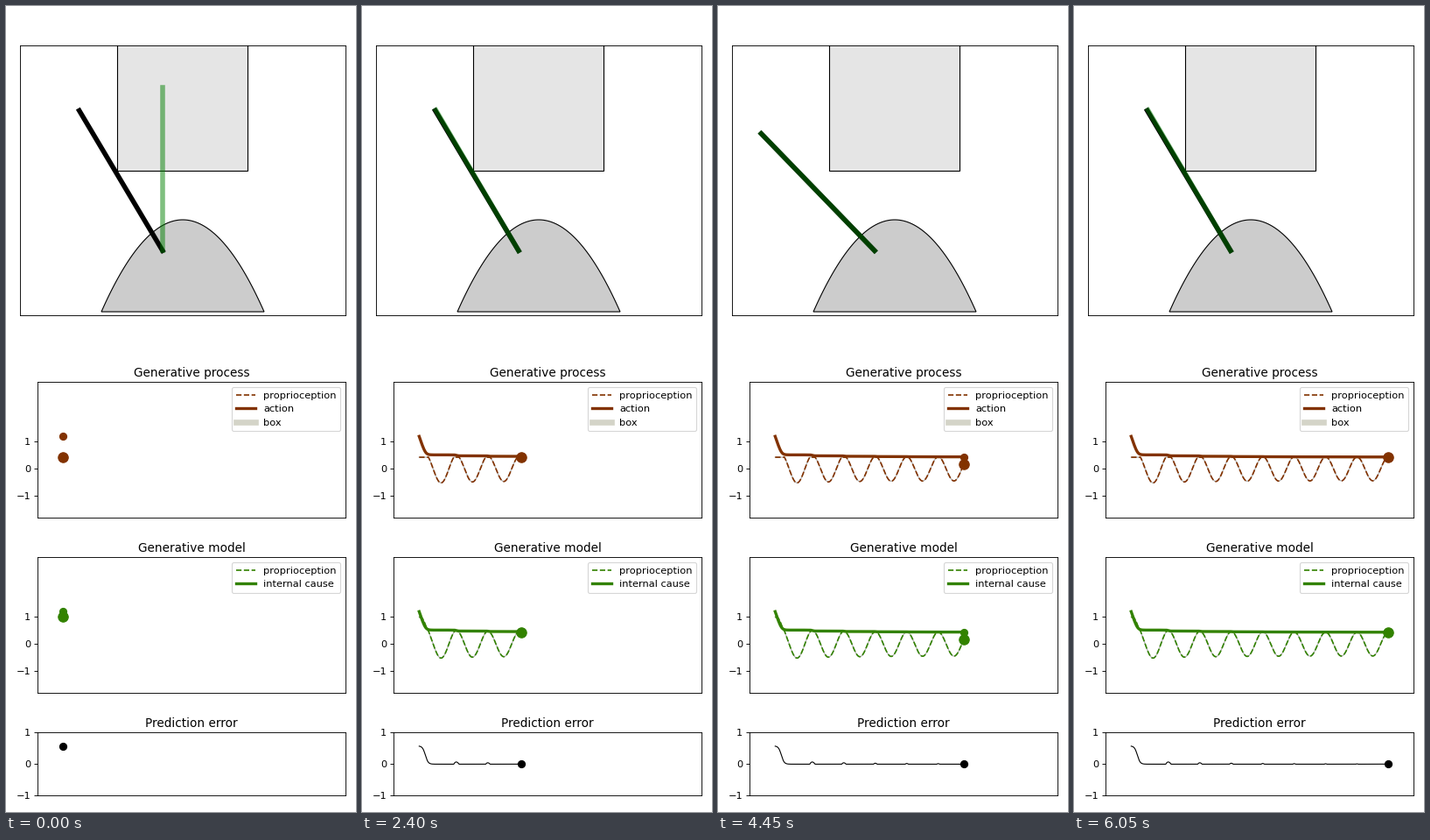
Write a matplotlib script that moves like this. It is 400 by 920 pixels and loops after 6.1 s.

```python
import numpy as np
import matplotlib.pyplot as plt
from matplotlib.animation import FuncAnimation
from matplotlib.patches import Polygon, Rectangle

W, H, DPI = 400, 920, 80
FRAMES, SUB = 122, 10
LIMIT = 0.43                 # angle at which the whisker meets the box
PERIOD, PEAK = 14.8, 2.9     # oscillation, in frames
BROWN, GREEN = "#823200", "#328200"
PIVOT, LENGTH = (178.9, 279.2), 186

plt.rcParams["font.size"] = 10.2


def simulate():
    """Amplitude, felt angle and predicted angle over time."""
    t = np.arange((FRAMES - 1) * SUB + 1) / SUB
    start = 1 / (1 + np.exp(1.5 * (t - 2.9)))
    start *= (1 - LIMIT) / start[0]
    wave = np.cos(2 * np.pi * (t - PEAK) / PERIOD)
    amp, felt, error = np.zeros((3, t.size))
    a = 1.2
    for i, s in enumerate(t):
        amp[i] = a
        if s < PEAK:
            felt[i], error[i] = LIMIT, start[i]
        else:
            swing = a * wave[i]
            felt[i] = min(swing, LIMIT)
            error[i] = start[i] if s < 8 else max(swing - LIMIT, 0)
        a -= (0.4 if s < 8 else 0.3) * error[i] / SUB
    return t, amp, felt, felt + error, error


t, amp, felt, guess, error = simulate()

fig = plt.figure(figsize=(W / DPI, H / DPI), dpi=DPI, facecolor="white")


def panel(left, top, right, bottom, **kw):
    box = [left / W, 1 - bottom / H, (right - left) / W, (bottom - top) / H]
    return fig.add_axes(box, **kw)


def chart(top, bottom, title, ylim):
    ax = panel(36, top, 388, bottom)
    span = FRAMES - 1
    ax.set(xlim=(-0.1 * span, 1.1 * span), ylim=ylim,
           xticks=[], yticks=[-1, 0, 1])
    ax.set_title(title)
    return ax


traces, dots = [], []


def trace(ax, data, **kw):
    line, = ax.plot([], [], **kw)
    traces.append((line, data))


def dot(ax, data, size, color):
    mark = ax.scatter([0], [data[0]], s=size, color=color, zorder=3)
    dots.append((mark, data))


def signals(ax, angle, drive, color, name):
    trace(ax, angle, color="#aaaaaa", lw=1)
    trace(ax, angle, color=color, lw=1.5, ls="--", label="proprioception")
    trace(ax, drive, color=color, lw=3, label=name)
    dot(ax, angle, 105, color)
    dot(ax, drive, 53, color)


# Scene in pixel units, y downwards
scene = panel(16, 45, 388, 353)
scene.set(xlim=(16, 388), ylim=(353, 45), xticks=[], yticks=[])
scene.add_patch(Rectangle((127.3, 20), 149.1, 168, fc="#e5e5e5", ec="black"))
u = np.linspace(-1, 1, 80)
scene.add_patch(Polygon(np.c_[202 + 93 * u, 244 + 105 * u**2],
                        fc="#cccccc", ec="black"))
real, = scene.plot([], [], color="black", lw=5)
ghost, = scene.plot([], [], color="green", lw=5, alpha=0.5)

process = chart(429.4, 584, "Generative process", (-1.8, 3.2))
signals(process, felt, amp, BROWN, "action")
process.plot([], [], color="#d4d4c8", lw=6, label="box")
process.legend(loc="upper right")

model = chart(629.4, 784, "Generative model", (-1.8, 3.2))
signals(model, guess, amp, GREEN, "internal cause")
model.legend(loc="upper right")

gap = chart(829.4, 901.4, "Prediction error", (-1, 1))
trace(gap, error, color="black", lw=1)
dot(gap, error, 53, "black")


def aim(line, angle):
    tilt = 0.3 * np.pi * (1 - angle)
    x, y = PIVOT
    line.set_data([x, x - LENGTH * np.sin(tilt)],
                  [y, y - LENGTH * np.cos(tilt)])


def update(frame):
    i = frame * SUB
    aim(real, felt[i])
    aim(ghost, guess[i])
    for line, data in traces:
        if i:
            line.set_data(t[:i + 1], data[:i + 1])
        else:
            line.set_data([], [])
    for mark, data in dots:
        mark.set_offsets([[t[i], data[i]]])


anim = FuncAnimation(fig, update, frames=FRAMES, interval=50,
                     repeat=True, repeat_delay=0, blit=False)
plt.show()
```
